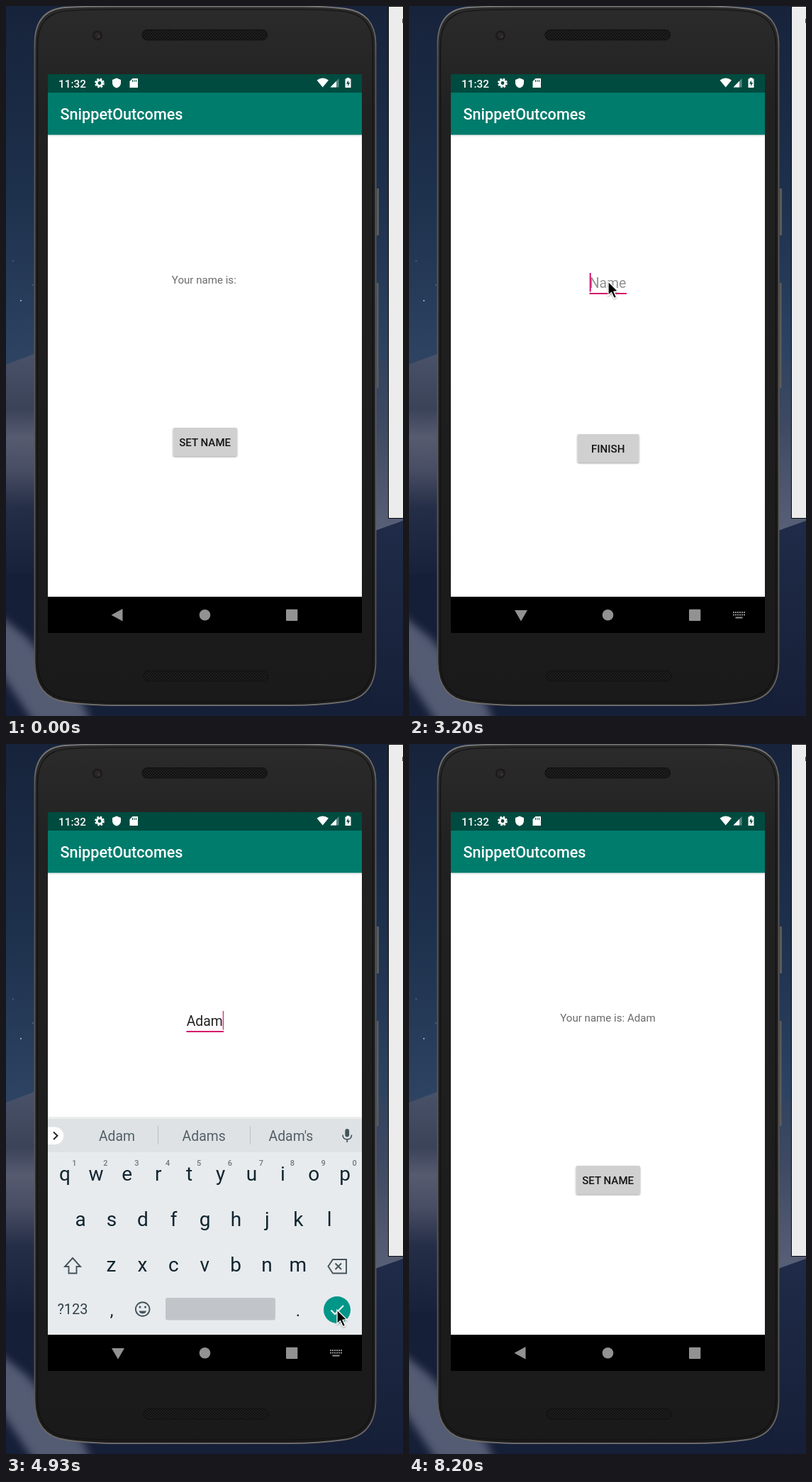
Recreate the animation shown at these times as an HTML page. Size 560 by 1000 pixels, loop 8390 ms.

```html
<!DOCTYPE html>
<html lang="en">
<head>
<meta charset="utf-8">
<title>Name entry demo</title>
<style>
  html, body { margin: 0; width: 100%; height: 100%; overflow: hidden; background: #141f3b; }
  svg { display: block; width: 100%; height: 100%; font-family: Roboto, sans-serif; }
  .mid { text-anchor: middle; }
  .btn { font-size: 15.1px; font-weight: 500; text-anchor: middle; fill: #151515; }
  .body { font-size: 15.1px; fill: #6a6a6a; }
  .field { font-size: 19.4px; }
  .line { fill: none; stroke: #45545c; stroke-width: 1.9; }
</style>
</head>
<body>
<svg viewBox="0 0 560 1000" preserveAspectRatio="none">
  <defs>
    <linearGradient id="sky" x2="0" y2="1">
      <stop offset="0" stop-color="#17233b"/><stop offset=".5" stop-color="#1d304c"/>
      <stop offset="1" stop-color="#2f4564"/>
    </linearGradient>
    <linearGradient id="dune" x2="0" y2="1">
      <stop offset="0" stop-color="#4a5269"/><stop offset=".24" stop-color="#3b4359"/>
      <stop offset=".36" stop-color="#565b70"/><stop offset=".5" stop-color="#474d63"/>
      <stop offset=".66" stop-color="#252e47"/><stop offset="1" stop-color="#151e37"/>
    </linearGradient>
    <linearGradient id="far" x2="0" y2="1">
      <stop offset="0" stop-color="#31435f"/><stop offset=".4" stop-color="#3f4a63"/>
      <stop offset="1" stop-color="#586077"/>
    </linearGradient>
    <linearGradient id="low" x2="0" y2="1">
      <stop offset="0" stop-color="#1f2b48"/><stop offset="1" stop-color="#161f37"/>
    </linearGradient>
    <linearGradient id="case" x2="0" y2="1">
      <stop offset="0" stop-color="#2b2b2b"/><stop offset=".15" stop-color="#212121"/>
      <stop offset="1" stop-color="#1a1a1a"/>
    </linearGradient>
    <linearGradient id="rim" x2="0" y2="1">
      <stop offset="0" stop-color="#7d7b79"/><stop offset=".07" stop-color="#5b5957"/>
      <stop offset=".93" stop-color="#595755"/><stop offset="1" stop-color="#6e6c6a"/>
    </linearGradient>
    <linearGradient id="drop" x2="0" y2="1">
      <stop offset="0" stop-color="#000" stop-opacity=".1"/><stop offset="1" stop-color="#000" stop-opacity="0"/>
    </linearGradient>
    <pattern id="mesh" width="4" height="4" patternUnits="userSpaceOnUse">
      <rect width="4" height="4" fill="#111"/><circle cx="1" cy="1" r=".8" fill="#303030"/><circle cx="3" cy="3" r=".8" fill="#303030"/>
    </pattern>
    <filter id="soft" x="-50%" y="-50%" width="200%" height="200%"><feGaussianBlur stdDeviation="6"/></filter>
    <filter id="lift" x="-30%" y="-30%" width="160%" height="180%">
      <feDropShadow dx="0" dy="1.2" stdDeviation="1.1" flood-opacity=".35"/>
    </filter>
  </defs>

  <!-- desktop -->
  <rect width="560" height="520" fill="url(#sky)"/>
  <path d="M0 505L45 488V820H0Z" fill="url(#dune)"/>
  <rect y="800" width="560" height="200" fill="#161f38"/>
  <path d="M-20 850L30 890L110 985L120 1010H40L-20 920Z" fill="#535b73" filter="url(#soft)"/>
  <path d="M515 500H560V730L515 741Z" fill="url(#far)"/>
  <path d="M515 741L560 725V1000H515Z" fill="url(#low)"/>
  <g fill="#c4cedb"><circle cx="21" cy="415" r=".9"/><circle cx="10" cy="359" r=".6"/><circle cx="38" cy="393" r=".6"/></g>
  <rect x="539.5" y=".5" width="30" height="721" fill="#ececec" stroke="#0b0b0b"/>
  <path d="M559.5 18V24" stroke="#555"/>

  <!-- phone -->
  <path d="M523 257H526V323H523ZM523 390H525.5V538H523Z" fill="#5e5c5a"/>
  <path d="M40.5 52C41 22 55 4 84 2Q110 .5 150 .5H415Q455 .5 480 4C507 8 521 25 521.5 52V925C521 958 506 976 476 980Q440 985 400 985H160Q115 985 84 980C55 976 41 958 40.5 925Z" fill="url(#case)" stroke="url(#rim)" stroke-width="1.8"/>
  <path d="M44.5 54C45 25 58 9 86 7Q110 5 150 5H415Q455 5 478 8C504 12 517 27 517.5 54V923C517 955 503 971 474 976Q440 980 400 980H160Q115 980 86 976C58 971 45 955 44.5 923Z" fill="none" stroke="#111" stroke-width="1.2"/>
  <rect x="192" y="33.5" width="176.5" height="14.5" rx="7" fill="url(#mesh)" stroke="#101010"/>
  <rect x="194" y="936.5" width="176" height="14.5" rx="7" fill="url(#mesh)" stroke="#101010"/>
  <circle cx="129" cy="41.5" r="7" fill="#1b1b1b"/><circle cx="129" cy="41.5" r="4.5" fill="#2b2627"/><circle cx="131" cy="43" r="1.5" fill="#453a3d"/>

  <!-- app frame -->
  <rect x="59" y="96" width="443" height="787" fill="#fff"/>
  <rect x="59" y="181.5" width="443" height="3.5" fill="url(#drop)"/>
  <rect x="59" y="96" width="443" height="26" fill="#004b3f"/>
  <rect x="59" y="122" width="443" height="59.5" fill="#007c6c"/>
  <text x="76.5" y="160" font-size="21.6" font-weight="500" fill="#fff">SnippetOutcomes</text>
  <g fill="#fff">
    <text x="74" y="114.5" font-size="15.3" font-weight="500">11:32</text>
    <g fill="none" stroke="#fff">
      <circle cx="132" cy="108.5" r="5.7" stroke-width="2.4" stroke-dasharray="2.6 1.877"/>
      <circle cx="132" cy="108.5" r="3.8" stroke-width="2.8"/>
    </g>
    <path d="M156 101.5L162 104V108C162 112 159.5 114.5 156 115.5C152.5 114.5 150 112 150 108V104Z"/>
    <path d="M178.5 102H186V115H174.5V106Z"/>
    <path d="M178.5 104V107M181 104V107M183.5 104V107" stroke="#004b3f"/>
    <path d="M438.5 104.5Q446.7 98.5 455 104.5L446.7 114.5Z"/>
    <path d="M469.5 102V114.5H457.5Z" opacity=".35"/><path d="M466 105.7V114.5H457.5Z"/>
    <path d="M478.5 102.5H480.5V101H484.5V102.5H486.5V115H478.5Z"/>
    <path d="M483 104.5L480 109.5H482.2V113L485.2 108H483Z" fill="#004b3f"/>
  </g>

  <!-- first screen -->
  <g id="home">
    <text id="label" class="body" y="390.7"></text>
    <rect id="setBtn" x="235.5" y="594" width="90.5" height="40" rx="2" filter="url(#lift)"/>
    <text class="btn" x="280.7" y="619.5">SET NAME</text>
  </g>

  <!-- second screen -->
  <g id="form">
    <text id="entry" class="field" x="254.7" y="396.5"></text>
    <path id="compose" stroke="#222" stroke-width="1"/>
    <rect id="under" x="254.5" y="404" width="52.5"/>
    <rect id="caret" y="376" height="26.5" fill="#d5106a"/>
    <rect id="endBtn" x="237.5" y="603" width="87" height="40" rx="2" filter="url(#lift)"/>
    <text class="btn" x="280.7" y="628.5">FINISH</text>
  </g>

  <!-- navigation bar -->
  <rect x="59" y="832" width="443" height="51"/>
  <g fill="#929292">
    <path id="back"/>
    <circle cx="280.5" cy="857.7" r="7.8"/>
    <rect x="395" y="849.7" width="16.3" height="16.3" rx="1"/>
    <g id="imeIcon">
      <path d="M457 854H474M457 857.5H474" fill="none" stroke="#929292" stroke-width="2" stroke-dasharray="2 1"/>
      <rect x="460.5" y="860.5" width="10" height="2"/>
    </g>
  </g>

  <!-- keyboard -->
  <g id="keys">
    <rect x="59" y="525" width="443" height="3" fill="#000" opacity=".07"/>
    <rect x="59" y="528" width="443" height="304" fill="#e8ebee"/>
    <rect x="59" y="528" width="443" height="47" fill="#dee2e5"/>
    <path d="M59 539.5H69A12 12 0 0 1 69 564H59Z" fill="#fff"/>
    <path d="M67 546.5L72.5 551.7L67 557" class="line" style="stroke:#222"/>
    <path d="M214.5 538V564M344.5 538V564" stroke="#b9c0c4"/>
    <g id="hints" class="mid" font-size="19.4" fill="#536067"></g>
    <rect x="478.3" y="542" width="5.8" height="11.5" rx="2.9" fill="#45545c"/>
    <path d="M475 550.5C475 559 487.5 559 487.5 550.5M481.2 557V561" class="line" style="stroke-width:1.7"/>
    <g id="letters" class="mid" font-size="28" fill="#10252f"></g>
    <path d="M94 724L105 736H99.5V745.5H88.5V736H83Z" class="line"/>
    <path d="M461 726H480V745.5H461L454.5 735.7ZM464.5 731.5L473 740M473 731.5L464.5 740" class="line"/>
    <text x="94" y="803" font-size="20" class="mid" fill="#33434b">?123</text>
    <circle cx="192.7" cy="796" r="9.8" class="line"/>
    <path d="M187.5 798.5A5.5 5.5 0 0 0 198 798.5Z" fill="#45545c"/>
    <circle cx="189" cy="793" r="1.5" fill="#45545c"/><circle cx="196.5" cy="793" r="1.5" fill="#45545c"/>
    <rect x="225" y="780" width="155" height="31.5" rx="3" fill="#c1c5c9"/>
    <circle id="done" cx="467" cy="797" r="19"/>
    <path d="M458.5 797.5L464 803L476 791" fill="none" stroke="#fff" stroke-width="2"/>
  </g>

  <path id="mouse" d="M0 0V19.5L4.5 15.5L8.2 23.5L11.5 22L8 14.2L13.8 13.7Z" stroke="#fff" stroke-width="1.3" filter="url(#lift)"/>
</svg>
<script>
const LOOP = 8390, STEP = 1000 / 15;
const $ = id => document.getElementById(id);
const set = (id, attrs) => { for (const k in attrs) $(id).setAttribute(k, attrs[k]); };
const ramp = (t, a, b) => Math.min(1, Math.max(0, (t - a) / (b - a)));
const out = p => 1 - (1 - p) ** 3;
const within = (t, spans) => spans.some(([a, b]) => t >= a && t < b);
const label = (x, y, s, extra = '') => `<text x="${x}" y="${y}" ${extra}>${s}</text>`;

const rows = [['qwertyuiop', 83, 615], ['asdfghjkl', 105, 679], ['zxcvbnm', 148.5, 742.5]];
$('letters').innerHTML =
  rows.map(([s, x, y]) => [...s].map((c, i) => label(x + i * 43.9, y, c)).join('')).join('') +
  [...'1234567890'].map((c, i) => label(96.5 + i * 43.9, 594, c, 'font-size="11" font-weight="500" fill="#6d787e"')).join('') +
  label(149, 806, ',', 'font-size="24"') + label(412, 806, '.', 'font-size="24"');

const NAME = 'Adam', TYPED = [3790, 3930, 4060, 4200];
const HINTS = [['thanks', 'I', 'we'], ['A', 'And', 'All'], ['Ad', 'Add', 'Ads'],
  ['Ada', 'Adam', 'Adapt'], ['Adam', 'Adams', "Adam's"]];
const CARET = [[3060, 3600], [3730, 4370], [4870, 5390], [5870, 6200]];

// pointer stops: time, x, y
const PATH = [[800, 519, 503], [1200, 297, 460], [1400, 297, 460], [1670, 281, 618],
  [2830, 281, 618], [3060, 281, 388], [4060, 281, 388], [4400, 505, 786], [4530, 514, 789],
  [4600, 514, 789], [4800, 467, 797], [5070, 467, 797], [5330, 342, 736], [5400, 334, 726],
  [5470, 334, 726], [5730, 283, 624], [6770, 283, 624], [7200, 505, 634]];

function pointer(t) {
  const i = PATH.findIndex(p => p[0] > t);
  if (i < 1) return null;
  const [t0, x0, y0] = PATH[i - 1], [t1, x1, y1] = PATH[i];
  const p = ramp(t, t0, t1), e = p * p * (3 - 2 * p);
  return [x0 + (x1 - x0) * e, y0 + (y1 - y0) * e];
}

// button tone while it is pressed and released
function tone(t, down) {
  const v = Math.round(208 - 24 * ramp(t, down - 60, down + 130) * (1 - ramp(t, down + 430, down + 650)));
  return `rgb(${v},${v},${v})`;
}

function draw(t) {
  const form = ramp(t, 2440, 2700) * (1 - ramp(t, 5960, 6190));
  const count = TYPED.filter(at => t >= at).length;
  const text = NAME.slice(0, count);
  const focused = t >= 3060;
  const ime = t >= 3060 && t < 5130;
  const named = t > 5500;

  set('home', { opacity: 1 - form });
  set('form', { opacity: form });
  $('label').textContent = 'Your name is:' + (named ? ' ' + NAME : '');
  set('label', { x: named ? 213.2 : 233.8 });
  set('setBtn', { fill: tone(t, 2000) });
  set('endBtn', { fill: tone(t, 5800) });

  $('entry').textContent = text || 'Name';
  set('entry', { fill: text ? '#222' : '#929292' });
  const end = 254.7 + (text ? $('entry').getComputedTextLength() : 0);
  set('compose', { d: text && t < 4900 ? `M254.7 399.5H${end}` : '' });
  set('under', focused ? { height: 2, fill: '#d5106a' } : { height: 1, fill: '#757575' });
  set('caret', {
    x: count ? Math.min(end, 305.9) : 254.7,
    width: count === 4 ? 1.1 : 2,
    opacity: within(t, CARET) ? 1 : 0
  });

  set('back', { d: ime ? 'M149 851H167L158 866.5Z' : 'M148.5 857.7L164.5 849V866.5Z' });
  set('imeIcon', { opacity: ime ? 1 : 0 });
  const shown = out(ramp(t, 3267, 3467)) * (1 - ramp(t, 5000, 5200) ** 2);
  set('keys', { opacity: shown, transform: `translate(0 ${50 * (1 - shown)})` });
  set('done', { fill: within(t, [[4860, 5000]]) ? '#009688' : '#07b0a2' });
  $('hints').innerHTML = HINTS[count].map((s, i) => label(156.5 + i * 122.7, 559, s)).join('');

  const at = pointer(t);
  set('mouse', { opacity: at ? 1 : 0, transform: `translate(${at || '0 0'})` });
}

const start = performance.now();
function frame() {
  const t = (performance.now() - start) % LOOP;
  draw(Math.floor((t + 5) / STEP) * STEP);
  requestAnimationFrame(frame);
}
frame();
</script>
</body>
</html>
```
